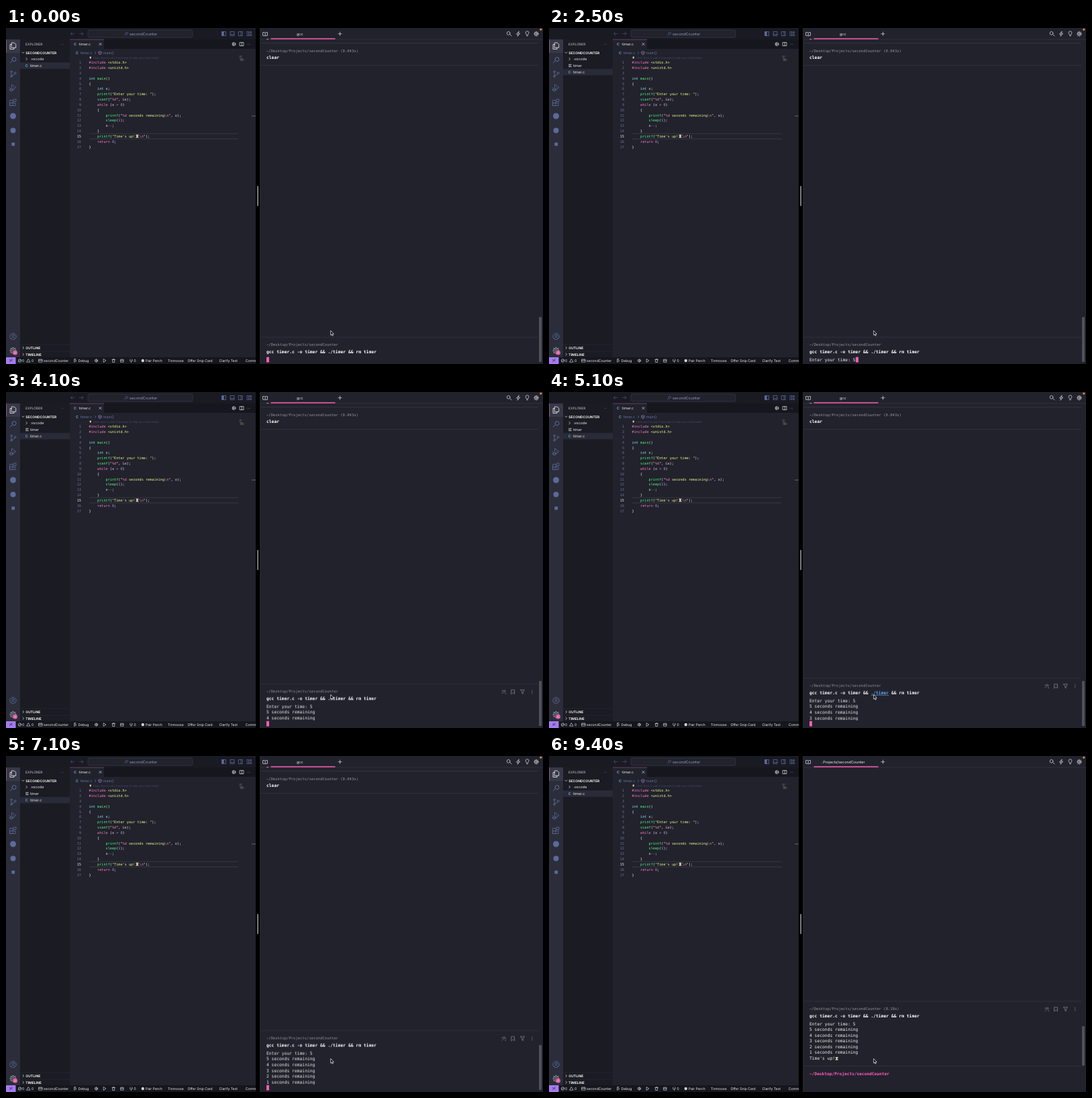
Recreate the animation shown at these times as an HTML page. Size 800 px wide and 500 px high, loop 9500 ms.

```html
<!DOCTYPE html>
<html lang="en">
<head>
<meta charset="utf-8">
<title>Countdown timer in C</title>
<style>
html, body { margin: 0; width: 100%; height: 100%; overflow: hidden; background: #000; }
svg { display: block; width: 100vw; height: 100vh; }
text { font: 5.45px Inter, sans-serif; fill: #f0f0ea; white-space: pre; text-rendering: geometricPrecision; }
.side { font-size: 5px; }
.bold { font-weight: 700; }
.dim { fill: #6272a4; }
.status { font-size: 5.1px; }
.hint { font-size: 4.1px; fill: #434a68; }
.code, .num { font: 5.2px "DejaVu Sans Mono", monospace; }
.num { fill: #68759f; text-anchor: end; }
.now { fill: #f0f0ea; }
.key { fill: #ff79c6; }
.type { fill: #8be9fd; }
.fn { fill: #50fa7b; }
.lit { fill: #bd93f9; }
.str { fill: #f1fa8c; }
.term text { font: 6.34px "DejaVu Sans Mono", monospace; }
.term .path { font-size: 5.55px; fill: #92929c; }
.term .cmd { font-weight: 700; fill: #fff; }
.term .prompt { font-size: 6.18px; font-weight: 700; fill: #ff5fb5; }
.icon { fill: none; stroke: #cfcfd4; stroke-width: .8; stroke-linecap: round; stroke-linejoin: round; }
.blue { stroke: #5b6a99; }
.grey { stroke: #85858f; }
.rule { stroke: #393944; stroke-width: .7; }

.anim { animation: 9.5s step-end infinite; }
.scroll { animation-name: scroll; }
.cover { animation-name: cover; }
.block { animation-name: block; }
.running { animation-name: running; }
.done { animation-name: done; }
.tools { animation-name: tools; }
.link { animation-name: link; }
.line { animation-name: line; }
.caret { animation-name: caret; }
.file { animation-name: file; }
.shift { animation-name: shift; }
.bar { animation-name: bar; }

@keyframes scroll {
  0% { transform: none; }
  30.52% { transform: translateY(-17.1px); }
  41.05% { transform: translateY(-25.7px); }
  51.57% { transform: translateY(-34.3px); }
  62.1% { transform: translateY(-42.8px); }
  72.63% { transform: translateY(-51.4px); }
  83.15%, 100% { transform: translateY(-95.2px); }
}
@keyframes cover {
  0% { transform: none; }
  4.21% { transform: translateY(9.4px); }
  30.52%, 100% { transform: none; }
}
@keyframes block {
  0% { transform: none; opacity: 1; }
  4.21% { transform: translateX(65px); }
  26.31% { transform: translateX(69px); }
  30.52% { transform: none; opacity: 1; }
  83.15%, 100% { opacity: 0; }
}
@keyframes running { 0% { opacity: 1; } 83.15%, 100% { opacity: 0; } }
@keyframes done { 0% { opacity: 0; } 83.15%, 100% { opacity: 1; } }
@keyframes tools { 0% { opacity: 0; } 30.52%, 100% { opacity: 1; } }
@keyframes link { 0% { fill: #fff; } 51.57% { fill: #63a9ee; } 62.1%, 100% { fill: #fff; } }
@keyframes line { 0% { opacity: 0; } 51.57% { opacity: 1; } 62.1%, 100% { opacity: 0; } }
@keyframes caret {
  0% { opacity: 0; }
  83.15% { opacity: 1; }
  88.42% { opacity: 0; }
  93.68% { opacity: 1; }
  98.94%, 100% { opacity: 0; }
}
@keyframes file { 0% { opacity: 0; } 7.36% { opacity: 1; } 88.42%, 100% { opacity: 0; } }
@keyframes shift { 0% { transform: none; } 7.36% { transform: translateY(9.6px); } 88.42%, 100% { transform: none; } }
@keyframes bar {
  0% { transform: none; }
  83.15%, 100% { transform: translateY(-28px) scaleY(.88); }
}
.bar { transform-origin: 0 430px; }
</style>
</head>
<body>
<svg viewBox="0 0 800 500">
  <defs>
    <g id="glass" fill="#e9d9b0">
      <path d="M0 0h4v.8l-1.4 1.5 1.4 1.5v.8h-4v-.8l1.4-1.5-1.4-1.5z"/>
    </g>
    <g id="gear" class="icon">
      <circle r="1.1"/><circle r="2.6"/>
      <path d="M0-3.5v.8M0 3.5v-.8M-3.5 0h.8M3.5 0h-.8M-2.5-2.5l.6.6M2.5 2.5l-.6-.6M-2.5 2.5l.6-.6M2.5-2.5l-.6.6"/>
    </g>
    <path id="lens" d="M-3.3 3.5L-1 1M-1.2-.7a2.4 2.4 0 1 0 4.8 0a2.4 2.4 0 1 0-4.8 0"/>
  </defs>

  <!-- Editor window -->
  <rect width="372" height="500" fill="#21222c"/>
  <rect width="372" height="17" fill="#1a1a23"/>
  <rect x="95" y="17" width="277" height="14" fill="#16161e"/>
  <rect x="95" y="17" width="51" height="14" fill="#21222c"/>
  <path d="M95 17.2h51" stroke="#8d4a77" stroke-width=".7"/>
  <rect y="17" width="21" height="473" fill="#2b2d3a"/>
  <rect x="21" y="17" width="74" height="473" fill="#1a1b23"/>

  <!-- Title bar -->
  <g class="icon blue">
    <path d="M102 8.5h-5.500m2.300-2.300-2.300 2.300 2.300 2.300M109.500 8.500h5.500m-2.300-2.300 2.300 2.300-2.300 2.300" opacity=".6"/>
    <rect x="122" y="3" width="156" height="11" rx="2" fill="#21222c" stroke="#343543"/>
    <use href="#lens" transform="translate(179 8.5) scale(.75)"/>
    <path d="M322 5.500h5.500v6h-5.500zM334.500 5.500h5.500v6h-5.500zM334.500 9.500h5.500M346.700 5.500h5.500v6h-5.500zM350.200 5.500v6M359.500 5.500h2v6h-2zM363.500 5.500h2v2h-2zM363.500 9.500h2v2h-2z"/>
    <path d="M322 5.500h2.300v6h-2.300z" fill="#5b6a99"/>
  </g>
  <text x="184" y="10.500" style="font-size:5.700px;fill:#8e98b8">secondCounter</text>

  <!-- Activity bar -->
  <rect y="17" width="21" height="20" fill="#373848"/>
  <rect y="17" width=".8" height="20" fill="#a0588a"/>
  <g class="icon" style="stroke:#f0f0ea">
    <path d="M8.500 22h4l2.200 2.300v5h-6.200zM8.500 24.500h-2.500v7h6v-2.200"/>
  </g>
  <g class="icon blue">
    <use href="#lens" transform="translate(10.500 47.500) scale(1.250)"/>
    <circle cx="8" cy="65" r="1.300"/><circle cx="8" cy="72" r="1.300"/><circle cx="13.500" cy="67" r="1.300"/>
    <path d="M8 66.300v4.400M13.500 68.300c0 2-4 1.200-5.500 2.500"/>
    <path d="M8.500 88v-4l6.500 4.500-4.500 3.300"/><circle cx="8" cy="92" r="2.200"/>
    <path d="M5 92h6M6 89.500l-1-1M10 89.500l1-1"/>
    <path d="M6 107.500h4v8h-4zM6 111.500h8v4h-8zM11.500 106h3.500v3.500h-3.500z"/>
    <circle cx="10.500" cy="459" r="4.700"/><circle cx="10.500" cy="457.700" r="1.600"/><path d="M7.500 462.500c1-3 5-3 6 0"/>
  </g>
  <g fill="#5b6a99">
    <circle cx="10.500" cy="131" r="4.500"/>
    <circle cx="10.500" cy="152.500" r="4"/>
    <rect x="8.300" y="170.500" width="4.800" height="4.800"/>
  </g>
  <use href="#gear" transform="translate(10.500 480) scale(1.400)" style="stroke:#5b6a99" opacity=".55"/>
  <circle cx="13.700" cy="483.300" r="3.300" fill="#e95fae"/>
  <text x="12.600" y="484.800" style="font-size:4px">1</text>

  <!-- Explorer -->
  <text class="side" x="29" y="26" style="fill:#c7c7cc">EXPLORER</text>
  <text x="81.500" y="25.500" style="fill:#aaaab2">···</text>
  <path class="icon" d="M24 36l1.500 1.500 1.500-1.500M30 44.500l1.500 1.700-1.500 1.700M25 474.300l1.500 1.700-1.500 1.700M25 484l1.500 1.700-1.500 1.700"/>
  <path d="M21 471.200h74M21 481h74" stroke="#2a2b36" stroke-width=".6"/>
  <text class="side bold" x="29.300" y="38.500">SECONDCOUNTER</text>
  <text x="36" y="48.200">.vscode</text>
  <g class="anim file">
    <path class="icon" d="M29.500 54.300h4M29.500 56h3M29.500 57.700h4"/>
    <text x="36" y="58">timer</text>
  </g>
  <g class="anim shift">
    <rect x="21" y="51.200" width="74" height="9.600" fill="#292b38"/>
    <text class="bold" x="28.700" y="58" style="fill:#5a9fd0">C</text>
    <text x="36" y="58">timer.c</text>
  </g>
  <text class="side bold" x="29.300" y="478">OUTLINE</text>
  <text class="side bold" x="29.300" y="487.700">TIMELINE</text>

  <!-- Editor tab and breadcrumb -->
  <text class="bold" x="101" y="26.200" style="fill:#5a9fd0">C</text>
  <text x="108.800" y="26">timer.c</text>
  <path class="icon" d="M139 22.500l3 3M142 22.500l-3 3M348.500 21.500h5.500v5h-5.500zM351.200 21.500v5"/>
  <g class="icon"><circle cx="339.500" cy="24" r="2.500"/><path d="M338.800 22.800l1.900 1.200-1.900 1.200z"/></g>
  <text x="359" y="25.500">···</text>
  <text class="bold" x="104" y="38.900" style="fill:#5a9fd0">C</text>
  <text class="dim" x="111" y="38.900">timer.c</text>
  <path class="icon blue" d="M132.500 35.500l1.500 1.500-1.500 1.500"/>
  <path class="icon" style="stroke:#9a79cf;stroke-width:.6" d="M140 34.500l2.300 1.200v2.600l-2.300 1.200-2.300-1.200v-2.600zM137.700 35.700l2.300 1.200 2.300-1.200M140 36.900v2.600"/>
  <text class="dim" x="144.700" y="38.900">main()</text>
  <circle cx="125.800" cy="43.800" r="1.300" fill="#e3d28a"/><path d="M125.200 45.500h1.200" stroke="#bbb" stroke-width=".8"/>
  <text class="hint" x="130" y="46">Click here to ask Tinmoose to help you code faster</text>
  <path d="M124 157.200h222.500M124 165h222.500" stroke="#40424f" stroke-width=".7"/>
  <g id="code"></g>
  <use href="#glass" x="193.500" y="158.700"/>
  <path d="M347.500 41.500h4M347.500 42.500h4" stroke="#8a4c74" stroke-width=".5"/>
  <path d="M347.500 44h3M348.500 45.500h5M348.500 46.500h4M349.500 47.500h6M348.500 48.600h5" stroke="#717a56" stroke-width=".5"/>
  <path d="M366 131h6" stroke="#777985" stroke-width=".8"/>

  <!-- Status bar -->
  <rect y="490" width="372" height="10" fill="#16161e"/>
  <rect y="490" width="14.500" height="10" fill="#a67cf0"/>
  <path class="icon" style="stroke:#2b2440" d="M5.500 493.500l1.800 1.500-1.800 1.500M9.300 492.800l-1.800 1.500 1.800 1.500"/>
  <g class="icon" style="stroke-width:.7">
    <circle cx="20.500" cy="495" r="2.200"/><path d="M19 496.500l3-3M33.500 492.700l2.500 4.400h-5z"/>
    <path d="M49 493h5v4h-5zM49 494.500h5M102 493.500l3 1.800-3 1.800zM102 492.500h2"/>
    <use href="#gear" transform="translate(134.500 495) scale(.7)"/>
    <path d="M145.500 492.700l3.500 2.300-3.500 2.300zM158 493.500h4.500M158.700 493.500v4h3v-4M159.500 492.600h1.500"/>
    <path d="M171 493.200h4v4h-4zM171 494.800h4M186.500 494.500v3M185.200 492.800c-1 1-1 2.300 0 3.300M187.800 492.800c1 1 1 2.300 0 3.300"/>
  </g>
  <circle cx="203.800" cy="495" r="2.200" fill="#cfcfd4"/>
  <text class="status" x="24" y="496.900">0</text>
  <text class="status" x="38" y="496.900">0</text>
  <text class="status" x="56" y="496.900">secondCounter</text>
  <text class="status" x="107.500" y="496.900">Debug</text>
  <text class="status" x="190.500" y="496.900">0</text>
  <text class="status" x="208" y="496.900">Pair Perch</text>
  <text class="status" x="241" y="496.900">Tinmoose</text>
  <text class="status" x="270.500" y="496.900">Offer Snip Card</text>
  <text class="status" x="317.500" y="496.900">Clarify Text</text>
  <text class="status" x="356.800" y="496.900">Comm</text>

  <!-- Divider and terminal window -->
  <rect x="372" width="6.500" height="500" fill="#000"/>
  <rect x="374.200" y="235" width="1.900" height="30" rx=".95" fill="#85858a"/>
  <rect x="378.500" width="421.500" height="500" fill="#22222d"/>
  <path class="rule" d="M378.800 0v500"/>

  <g class="term">
    <g class="anim running">
      <path class="rule" d="M379 22.500h414M379 55.500h414"/>
      <path d="M388.300 16.700h3" stroke="#ddd" stroke-width="1"/>
      <text class="path" x="388" y="35.500">~/Desktop/Projects/secondCounter (0.043s)</text>
      <text class="cmd" x="388" y="46.200">clear</text>
    </g>

    <g class="anim scroll">
      <path class="rule" d="M379 460.200h414"/>
      <text class="path" x="388" y="473">~/Desktop/Projects/secondCounter<tspan class="anim done"></tspan></text>
      <text class="path anim done" x="498.300" y="473">(8.18s)</text>
      <text class="cmd" x="388" y="484">gcc timer.c -o timer &amp;&amp; <tspan class="anim link">./timer</tspan> &amp;&amp; rm timer</text>
      <path class="anim line" d="M479.800 485.600h26.500" stroke="#63a9ee" stroke-width=".7"/>
      <g class="anim tools">
        <g class="icon grey">
          <path d="M739 474.500l3.500-3.500M741 469.500l3 3M742.500 469l2 2M738.800 470.500h1.500M743.500 474.500h1"/>
          <path d="M753 469h4.500v6l-2.250-1.800-2.250 1.800zM766.500 469h6l-2.200 2.800v3l-1.600-.8v-2.200z"/>
        </g>
        <g fill="#85858f"><circle cx="783.800" cy="469.500" r=".6"/><circle cx="783.800" cy="471.700" r=".6"/><circle cx="783.800" cy="473.900" r=".6"/></g>
      </g>
      <g id="output"></g>
      <use href="#glass" x="426.700" y="542.800" transform="translate(0 .3)"/>
    </g>
    <rect class="anim cover" x="380" y="489" width="412" height="14" fill="#22222d"/>
    <rect class="anim block" x="388" y="489.700" width="4" height="7.800" fill="#f95fb0"/>

    <g class="anim done">
      <path class="rule" d="M379 461.300h414"/>
      <text class="prompt" x="388" y="475">~/Desktop/Projects/secondCounter</text>
    </g>
    <rect class="anim caret" x="388" y="482.500" width="1.500" height="7.500" fill="#f95fb0"/>
  </g>
  <rect class="anim bar" x="794" y="430" width="4" height="67" rx="1" fill="#50505a"/>

  <!-- Terminal tab bar -->
  <path class="rule" d="M379 17h421"/>
  <path d="M394.500 16h96" stroke="#f95fb0" stroke-width="1.300"/>
  <g class="icon">
    <path d="M383 6.500h2.300l.9.900.9-.9h2.400v4.800h-2.400l-.9.700-.9-.7h-2.300zM386.200 7.400v4M495 8.700h5M497.500 6.200v5"/>
    <use href="#lens" transform="translate(749.800 8.500) scale(-1 1)"/>
    <path d="M764 5.200l-3.500 4h2.300l-.8 3.100 3.700-4.200h-2.400z"/>
    <path d="M775.500 10c0-1-1.400-1.300-1.400-2.800a2.400 2.400 0 0 1 4.800 0c0 1.500-1.400 1.800-1.400 2.800zM775.700 11.800h1.600"/>
    <use href="#gear" x="790" y="8.700"/>
  </g>
  <circle cx="796.800" cy="2.200" r="1.500" fill="#e8963c"/>
  <g text-anchor="middle">
    <text class="anim running" x="437.800" y="10.500">gcc</text>
    <text class="anim done" x="437.800" y="10.500">..Projects/secondCounter</text>
  </g>

  <path d="M483.700 450.300v6.700l1.500-1.300 1 2.400 1.100-.5-1-2.300h2z" fill="#000" stroke="#fff" stroke-width=".7"/>
</svg>

<script>
const source = String.raw`#include <stdio.h>
#include <unistd.h>

int main()
{
    int x;
    printf("Enter your time: ");
    scanf("%d", &x);
    while (x > 0)
    {
        printf("%d seconds remaining\n", x);
        sleep(1);
        x--;
    }
    printf("Time's up!  \n");
    return 0;
}`;
const output = ["Enter your time: 5",
  ...[5, 4, 3, 2, 1].map(n => n + " seconds remaining"), "Time's up!"];
const plain = /(?<str><[\w.]+>)|(?<key>#include|while|return|[>&]|--)|(?<type>int\b)|(?<fn>printf|scanf|main|sleep)|(?<lit>\d)/g;
const quoted = /(?<key>%d|\\n)/g;

function add(parent, tag, text, attrs) {
  const el = document.createElementNS("http://www.w3.org/2000/svg", tag);
  for (const name in attrs) el.setAttribute(name, attrs[name]);
  el.textContent = text;
  return parent.appendChild(el);
}

// Splits text into coloured spans; unmatched parts take the base class.
function paint(line, text, rule, base) {
  let at = 0;
  for (const m of text.matchAll(rule)) {
    const kind = Object.keys(m.groups).find(k => m.groups[k]);
    add(line, "tspan", text.slice(at, m.index), { class: base });
    add(line, "tspan", m[0], { class: kind });
    at = m.index + m[0].length;
  }
  add(line, "tspan", text.slice(at), { class: base });
}

const code = document.getElementById("code");
source.split("\n").forEach((row, i) => {
  const y = 53.3 + i * 7.83;
  add(code, "text", i + 1, { class: i === 14 ? "num now" : "num", x: 112, y });
  const line = add(code, "text", "", { class: "code", x: 123.6, y });
  for (const part of row.split(/("[^"]*")/)) {
    if (part[0] === '"') paint(line, part, quoted, "str");
    else paint(line, part, plain, "");
  }
});

const out = document.getElementById("output");
output.forEach((row, i) => add(out, "text", row, { x: 388, y: 495.8 + i * 8.57 }));
</script>
</body>
</html>
```
